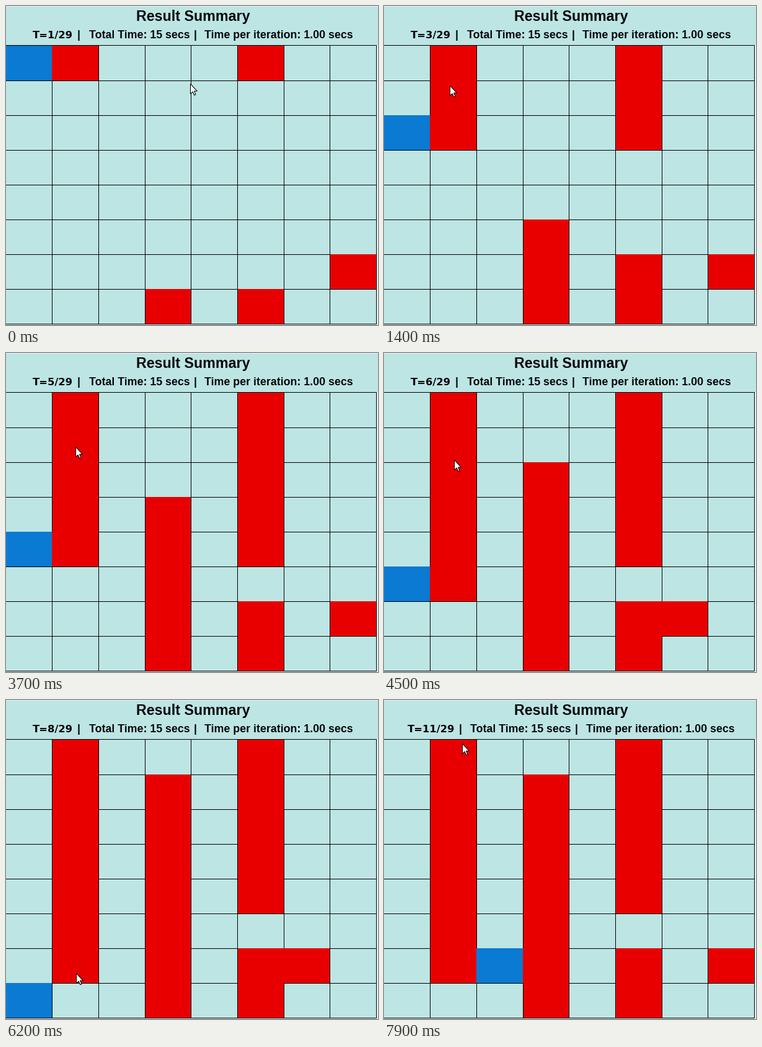
A matplotlib script that plays this animation: 600 by 514 pixels, repeating every 8 s.

```python
import numpy as np
import matplotlib.pyplot as plt
from matplotlib.animation import FuncAnimation
from matplotlib.patches import Polygon, Rectangle

W, H, DPI = 600, 514, 100
FRAMES, INTERVAL = 80, 100
N = 8
BG, RED, BLUE, INK = "#bde5e3", "#e80000", "#0a7ad2", "#05070c"
PALE = "#e6f2f5"

# Pixel positions of the grid lines
XS = [-1] + [int(74.7 * k) for k in range(1, N + 1)]
YS = [int(63.9 + 56.1 * k) for k in range(N + 1)]

# Pointer tip: time in ms, x, y
POINTER = np.array([
    (0, 297, 125), (200, 290, 126), (1000, 112, 129), (1400, 106, 128),
    (2900, 110, 130), (4500, 113, 172), (5200, 113, 270), (6000, 113, 440),
    (6300, 113, 440), (6700, 110, 400), (7300, 104, 211), (7900, 126, 70),
])
ARROW = np.array([(0, 0), (0, 16), (3.7, 12.6), (6.2, 18.2),
                  (8.5, 17.2), (6.1, 11.6), (10.8, 11.6)])

fig = plt.figure(figsize=(W / DPI, H / DPI), dpi=DPI, facecolor=BG)
ax = fig.add_axes([0, 0, 1, 1])
ax.set_xlim(0, W)
ax.set_ylim(H, 0)
ax.axis("off")


def box(x, y, w, h, color, z=1):
    return ax.add_patch(Rectangle((x, y), w, h, fc=color, lw=0,
                                  antialiased=False, zorder=z))


def label(x, y, text, px, family="Liberation Sans", ha="left"):
    return ax.text(x, y, text, fontsize=px * 72 / DPI, family=family,
                   weight="bold", color=INK, ha=ha, va="baseline", zorder=5)


box(0, 0, W, 1, PALE)
box(XS[-1] + 1, 63, W, H, PALE)
box(0, YS[-1] + 1, W, 2, PALE)
for x in XS[1:]:
    box(x, YS[0], 1, YS[-1] - YS[0] + 1, "black", 2)
for y in YS:
    box(0, y, XS[-1] + 1, 1, "black", 2)

cells = {(r, c): box(0, YS[r] + (r == 0), 1, YS[r + 1] - YS[r] - (r == 0), RED, 3)
         for r in range(N) for c in range(N)}

label(301.5, 24, "Result Summary", 23.2, ha="center")
counter = label(43, 52, "", 16.4, "DejaVu Sans")
# Header parts that shift right when the counter gains a digit
parts = [(x, label(x, 52, s, 17.75)) for x, s in [
    (115, "|"), (134, "Total Time: 15 secs"), (302.5, "|"),
    (320.5, "Time per iteration: 1.00 secs")]]

pointer = ax.add_patch(Polygon(ARROW, closed=True, fc="white", ec="black",
                               lw=0.75, joinstyle="miter", zorder=6))


def step_at(ms):
    return 2 + int((ms - 580) // 810) if ms >= 580 else 1


def walls(step):
    """Red cells: four growing bars and one block swinging sideways."""
    red = {(r, 1) for r in range(min(step, 7))}
    red |= {(r, 5) for r in range(min(step, 5))}
    red |= {(7 - r, 3) for r in range(min(step, 7))}
    red |= {(7 - r, 5) for r in range(min(step, 2))}
    red.add((6, 7 if step % 2 else 6))
    return red


def walker(step):
    if step <= 8:
        return step - 1, 0
    return (7, step - 8) if step <= 10 else (17 - step, 2)


def draw(i):
    ms = i * INTERVAL
    step = step_at(ms)
    red, blue = walls(step), walker(step)
    for (r, c), cell in cells.items():
        filled = (r, c) in red or (r, c) == blue
        cell.set_visible(filled)
        if not filled:
            continue
        left = (r, c - 1)
        hide_line = (r, c) == blue or left in red or left == blue
        x = XS[c] + (0 if hide_line and c else 1)
        cell.set_x(x)
        cell.set_width(XS[c + 1] - x)
        cell.set_facecolor(BLUE if (r, c) == blue else RED)

    shift = 5.3 if step >= 10 else 0
    counter.set_text(f"T={step}/29")
    counter.set_x(43 - shift)
    for x, text in parts:
        text.set_x(x + shift)

    t, px, py = POINTER.T
    tip = np.round([np.interp(ms, t, px), np.interp(ms, t, py)]) + 0.5
    pointer.set_xy(ARROW + tip)
    return [*cells.values(), counter, *(p[1] for p in parts), pointer]


anim = FuncAnimation(fig, draw, frames=FRAMES, interval=INTERVAL,
                     repeat=True, repeat_delay=0, blit=False)
plt.show()
```
